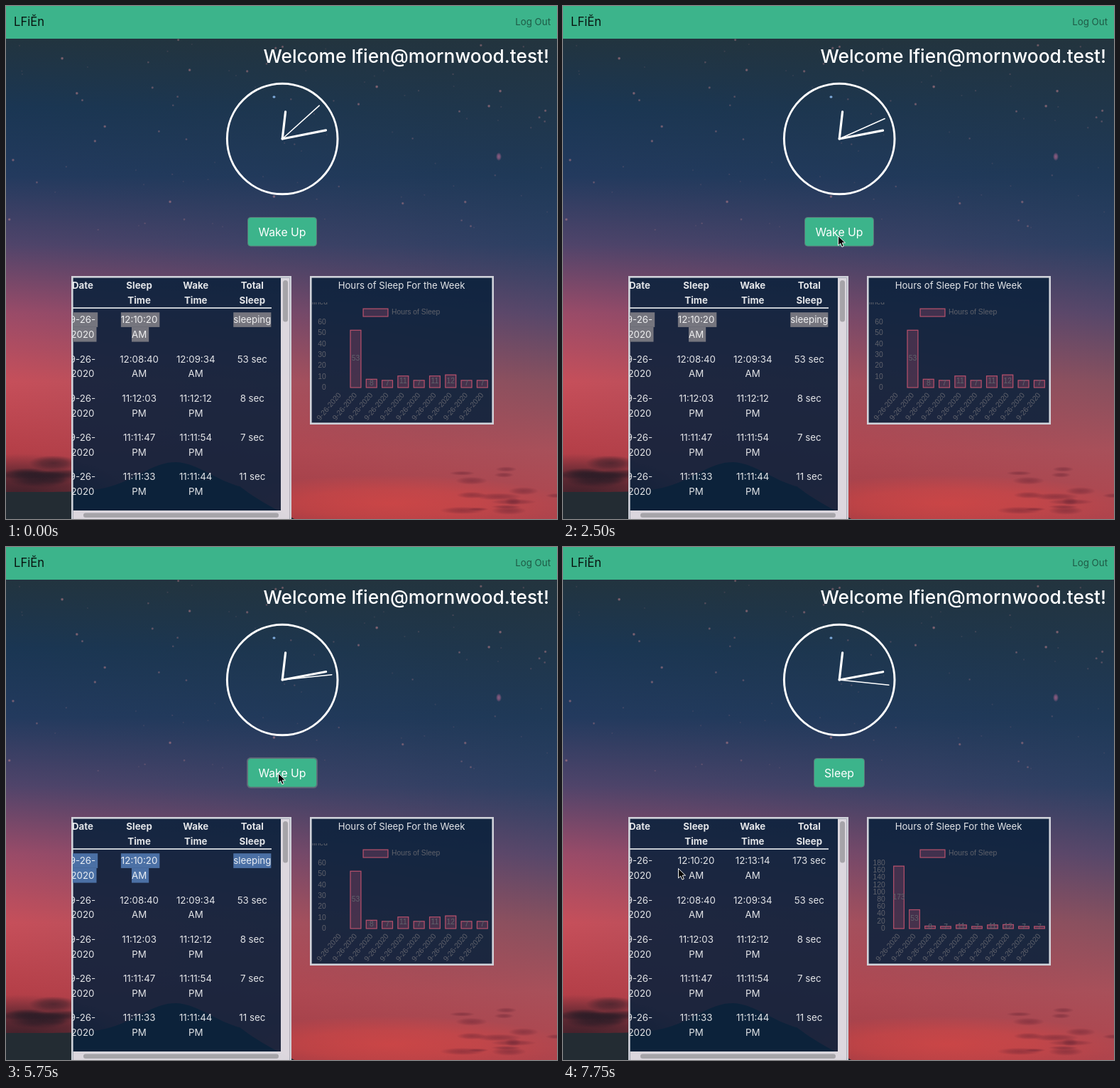
These frames come from a looping animation (776x722 px, 8000 ms). An HTML page with a canvas:

```html
<!DOCTYPE html>
<html lang="en">
<head>
<meta charset="utf-8">
<title>Sleep log</title>
<style>
  html, body { margin: 0; width: 100%; height: 100%; overflow: hidden; background: #22333f; }
  canvas { display: block; }
</style>
</head>
<body>
<canvas id="stage" width="776" height="722"></canvas>
<script>
const W = 776, H = 722, NAV = 46, LOOP = 8000, STEP = 250;
const SANS = 'Inter, sans-serif', ARIAL = '"Liberation Sans", sans-serif';
const GREEN = '#3cb48b', PALE = 'rgba(255,255,255,.88)', GREY = '#60626b';
const FOCUS = 5000, PRESS = 5750, AWAKE = 6000, SAVED = 6500, BLUR = 7750;
let ctx = document.getElementById('stage').getContext('2d');

const lerp = (a, b, k) => a + (b - a) * k;

function text(str, x, y, size, { weight = 400, color = PALE, align = 'center', base = 'alphabetic', family = SANS } = {}) {
  ctx.font = `${weight} ${size}px ${family}`;
  ctx.fillStyle = color;
  ctx.textAlign = align;
  ctx.textBaseline = base;
  ctx.fillText(str, x, y);
}

function box(x, y, w, h, color) {
  ctx.fillStyle = color;
  ctx.fillRect(x, y, w, h);
}

function pill(x, y, w, h, r, fill, stroke) {
  ctx.beginPath();
  ctx.roundRect(x, y, w, h, r);
  ctx.fillStyle = fill;
  ctx.fill();
  if (!stroke) return;
  ctx.strokeStyle = stroke;
  ctx.lineWidth = 1;
  ctx.stroke();
}

function clipped(x, y, w, h, draw) {
  ctx.save();
  ctx.beginPath();
  ctx.rect(x, y, w, h);
  ctx.clip();
  draw();
  ctx.restore();
}

// Background sky

function blob(x, y, rx, ry, rgb, alpha) {
  ctx.save();
  ctx.translate(x, y);
  ctx.scale(rx, ry);
  const g = ctx.createRadialGradient(0, 0, 0, 0, 0, 1);
  g.addColorStop(0, `rgba(${rgb},${alpha})`);
  g.addColorStop(.5, `rgba(${rgb},${alpha * .7})`);
  g.addColorStop(1, `rgba(${rgb},0)`);
  ctx.fillStyle = g;
  ctx.fillRect(-1, -1, 2, 2);
  ctx.restore();
}

function seeded(seed) {
  return () => (seed = (seed * 16807) % 2147483647) / 2147483647;
}

function verticalGradient(colors) {
  const g = ctx.createLinearGradient(0, NAV, 0, H);
  colors.split(' ').forEach((c, i, all) => g.addColorStop(i / (all.length - 1), '#' + c));
  return g;
}

function drawSky() {
  const west = verticalGradient('22343f 1a3653 233a5e 50446a 9a4b68 c64f5a b53f48 8e343c');
  const east = verticalGradient('23343e 20364a 1f3957 2b3f62 55476a 86505f a8505a b0444c');
  box(0, 0, W, H, west);
  for (let x = 0; x < W; x += 4) {
    ctx.globalAlpha = x / W;
    box(x, 0, 4, H, east);
  }
  ctx.globalAlpha = 1;

  const rand = seeded(41);
  for (let i = 0; i < 100; i++) {
    const glow = rand() ** 3;
    blob(rand() * W, NAV + rand() * 270, 1.4 + glow, 1.4 + glow, '185,125,135', .15 + glow * .6);
  }
  blob(694, 212, 4, 6, '170,100,140', .8);
  blob(377.5, 128, 2.6, 2.2, '150,200,255', 1);

  // warm horizon, then cloud banks on both sides
  blob(540, 700, 250, 40, '225,72,68', .6);
  blob(20, 690, 150, 60, '55,30,40', .9);
  for (let i = 0; i < 8; i++) blob(rand() * 95, 640 + rand() * 30, 20 + rand() * 30, 5 + rand() * 7, '42,28,38', .6);
  for (let i = 0; i < 14; i++) blob(640 + rand() * 136, 645 + rand() * 72, 10 + rand() * 25, 2 + rand() * 4, '100,34,50', .45);

  ctx.beginPath();
  ctx.moveTo(0, H);
  for (let x = 0; x <= 420; x += 6)
    ctx.lineTo(x, 684 - 42 * Math.exp(-(((x - 238) / 70) ** 2)) + Math.max(0, x - 330) * .5);
  ctx.lineTo(420, H);
  ctx.fillStyle = '#232c33';
  ctx.fill();
}

// Page parts

function drawHeader() {
  box(0, 0, W, NAV, GREEN);
  text('LFiĔn', 11, 27.5, 16.6, { color: '#08130f', align: 'left' });
  text('Log Out', 767, 26.5, 13.3, { color: 'rgba(0,0,0,.5)', align: 'right' });
  text('Welcome lfien@mornwood.test!', 765, 80, 26.3, { weight: 500, color: '#fff', align: 'right' });
}

function drawClock(t) {
  const seconds = 8 + Math.floor((t + 500) / 1000);
  const minutes = 13 + seconds / 60;
  const hand = (turn, length, width) => {
    const a = turn * Math.PI * 2;
    ctx.beginPath();
    ctx.moveTo(0, 0);
    ctx.lineTo(Math.sin(a) * length, -Math.cos(a) * length);
    ctx.lineWidth = width;
    ctx.stroke();
  };
  ctx.save();
  ctx.translate(389.2, 187);
  ctx.strokeStyle = '#fff';
  ctx.lineCap = 'round';
  ctx.lineWidth = 3;
  ctx.beginPath();
  ctx.arc(0, 0, 77.8, 0, Math.PI * 2);
  ctx.stroke();
  hand(minutes / 720, 38.5, 3.2);
  hand(minutes / 60, 62.5, 3.2);
  hand(seconds / 60, 70, 1.6);
  ctx.restore();
}

function drawButton(t) {
  const [label, w] = t < AWAKE ? ['Wake Up', 97] : ['Sleep', 71];
  const x = 389 - w / 2;
  const ring = t < PRESS || t >= BLUR ? 0 : t < AWAKE ? 1.5 : 3;
  if (ring) pill(x - ring, 297.5 - ring, w + ring * 2, 40.5 + ring * 2, 4 + ring, 'rgba(130,130,140,.5)');
  pill(x, 297.5, w, 40.5, 4, GREEN, '#5f7478');
  text(label, 389, 323.8, 15.8, { color: '#fff' });
}

function panel(x, y, w, h) {
  box(x, y, w, h, 'rgba(10,34,60,.88)');
  ctx.strokeStyle = 'rgba(235,235,240,.88)';
  ctx.lineWidth = 2.6;
  ctx.strokeRect(x + 1.3, y + 1.3, w - 2.6, h - 2.6);
}

// One table cell, a word per line; marked lines get a highlight
function cell(words, column, y, { weight, mark } = {}) {
  const x = 108 + column * 79.6;
  words.split(' ').forEach((word, i) => {
    const line = y + i * 20.7;
    if (mark && word) {
      ctx.font = `400 13.3px ${SANS}`;
      const w = ctx.measureText(word).width;
      box(x - w / 2, line - 15, w + (column < 3 ? 3 : 0), 20.7, mark);
    }
    text(word, x, line, 13.3, { weight });
  });
}

function drawTable(t) {
  const saved = t >= SAVED;
  const selection = t < FOCUS ? '#75757e' : t < BLUR ? '#4b70a5' : null;
  const rows = [
    saved ? ['12:10:20 AM', '12:13:14 AM', '173 sec'] : ['12:10:20 AM', '', 'sleeping'],
    ['12:08:40 AM', '12:09:34 AM', '53 sec'],
    ['11:12:03 PM', '11:12:12 PM', '8 sec'],
    ['11:11:47 PM', '11:11:54 PM', '7 sec'],
    ['11:11:33 PM', '11:11:44 PM', '11 sec']
  ];
  panel(92, 380, 310, 360);
  box(387, 382.6, 12.4, 327.4, 'rgba(250,242,246,.87)');
  box(94.6, 710, 304.8, 12, 'rgba(250,242,246,.87)');
  pill(390, 386, 7, 58.5, 3.5, '#a6a4a9');
  pill(109, 713.5, 275, 6.5, 3.2, '#a6a4a9');

  clipped(94, 382, 293, 328, () => {
    ['Date', 'Sleep Time', 'Wake Time', 'Total Sleep'].forEach((title, c) => cell(title, c, 398, { weight: 700 }));
    box(94, 424, 280, 2, 'rgba(222,226,230,.88)');
    rows.forEach((row, r) => ['9-26- 2020', ...row].forEach((value, c) => {
      // the total keeps its own node once saved, so it leaves the selection
      const marked = r === 0 && !(saved && c === 3);
      const words = c === 3 ? value.replace(' ', '\u00a0') : value;
      cell(words, c, 446.2 + r * 55.3, { mark: marked && selection });
    }));
  });
}

function chartLabel(str, x, y, align = 'center') {
  text(str, x, y, 10.3, { color: GREY, align, base: 'middle', family: ARIAL });
}

function chartBox(x, y, w, h) {
  box(x, y, w, h, 'rgba(255,99,132,.19)');
  ctx.strokeStyle = '#b4506b';
  ctx.lineWidth = 1.2;
  ctx.strokeRect(x + .6, y + .6, w - 1.2, h - .6);
}

function drawChart(t) {
  const saved = t >= SAVED, base = 537, right = 682;
  const before = { top: 60, tick: 10, left: 459 }, after = { top: 180, tick: 20, left: 462 };
  const axis = saved ? after : before;
  const ease = saved ? 1 - Math.max(0, 1 - (t - SAVED) / 1000) ** 4 : 0;
  const slot = ({ left }) => (right - left) / 10;
  const height = (value, { top }) => value / top * 92;

  panel(428, 380, 259, 209);
  text('Hours of Sleep For the Week', 557, 398, 13.2);
  chartBox(502.5, 425.5, 36, 11.5);
  chartLabel('Hours of Sleep', 543, 431, 'left');
  for (let v = 0; v <= axis.top; v += axis.tick) chartLabel(v, axis.left - 8.2, base - height(v, axis), 'right');

  [saved ? 173 : 0, 53, 8, 7, 11, 7, 11, 12, 7, 7].forEach((value, i) => {
    const barLeft = a => a.left + slot(a) * (i + .14);
    if (value) {
      const x = lerp(barLeft(before), barLeft(after), ease);
      const w = slot(axis) * .72;
      const h = lerp(i ? height(value, before) : 0, height(value, after), ease);
      chartBox(x, base - h, w, h);
      chartLabel(value, x + w / 2, base - h / 2);
    }
    ctx.save();
    ctx.translate(axis.left + slot(axis) * (i + .5), 546);
    ctx.rotate(-50 * Math.PI / 180);
    chartLabel('9-26-2020', 0, 0, 'right');
    ctx.restore();
  });
  if (!saved) clipped(431, 417, 40, 10, () => chartLabel('undefined', 453, 417, 'right'));
}

// Pointer stops, each held until the next: time, x, y
const pointerStops = [
  [500, 631, 12], [750, 515, 257], [1000, 546, 382], [2000, 424, 353], [2250, 387, 323],
  [3000, 383, 318], [7000, 274, 393], [7250, 171, 450], [7500, 162, 452]
];

function drawPointer(t) {
  const stop = pointerStops.findLast(([time]) => time <= t);
  if (!stop) return;
  ctx.save();
  ctx.translate(stop[1] + .5, stop[2] + .5);
  const arrow = new Path2D('M0 0V13.5L3.2 10.6 5.4 15.6 7.8 14.6 5.7 9.7H10Z');
  ctx.fillStyle = '#000';
  ctx.strokeStyle = '#f4f4f4';
  ctx.lineWidth = 1;
  ctx.fill(arrow);
  ctx.stroke(arrow);
  ctx.restore();
}

const sky = document.createElement('canvas');
sky.width = W;
sky.height = H;
const stage = ctx;
ctx = sky.getContext('2d');
drawSky();
ctx = stage;

function render() {
  const t = Math.floor(performance.now() % LOOP / STEP) * STEP;
  ctx.drawImage(sky, 0, 0);
  drawHeader();
  drawClock(t);
  drawButton(t);
  drawTable(t);
  drawChart(t);
  drawPointer(t);
  requestAnimationFrame(render);
}
render();
</script>
</body>
</html>
```
